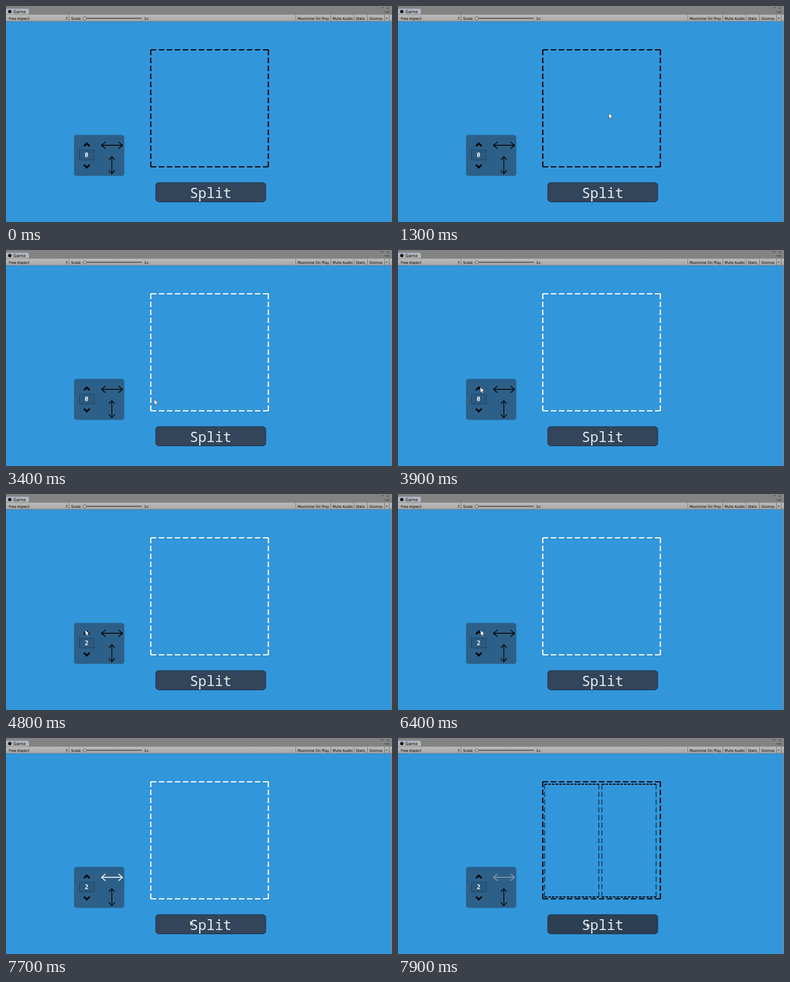
These frames come from a looping animation (640x360 px, 8 s). An HTML page:

```html
<!DOCTYPE html>
<html lang="en">
<head>
<meta charset="utf-8">
<title>Split box</title>
<style>
  html, body { margin: 0; width: 100%; height: 100%; overflow: hidden; background: #3296da; }
  svg { display: block; width: 640px; height: 360px; }
  .ui { font: 5.9px "DejaVu Sans", sans-serif; fill: #000; }
  .mono { font-family: "Noto Sans Mono", "DejaVu Sans Mono", monospace; text-anchor: middle; fill: #e9eef1; }
  .line { fill: none; stroke: currentColor; }
  .dark { color: #04070a; }
</style>
</head>
<body>
<svg viewBox="0 0 640 360">
  <defs>
    <linearGradient id="bar" x2="0" y2="1">
      <stop offset="0" stop-color="#bcbcbc"/>
      <stop offset="1" stop-color="#a6a6a6"/>
    </linearGradient>
    <!-- dashed square, 195 units a side -->
    <g id="box" class="line" stroke-width="2.2" stroke-dasharray="9 4.29">
      <path d="M0 0H195"/><path d="M0 195H195"/>
      <path d="M0 0V195"/><path d="M195 0V195"/>
    </g>
    <path id="chevron" class="line" stroke-width="2.8" d="M-4.7 2.4L0 -2.3L4.7 2.4"/>
    <g id="head" class="line"><path d="M6.5 -5.8L0 0L6.5 5.8"/></g>
  </defs>
  <rect width="640" height="360" fill="#3296da"/>

  <g id="toolbar">
    <rect width="640" height="14" fill="#838383"/>
    <path d="M0 14V4.5H36Q38 4.5 38 6.5V14Z" fill="#b7b8be"/>
    <path d="M0 4.8H37" stroke="#8c99c8" stroke-width=".8"/>
    <rect y="14" width="640" height="11.5" fill="url(#bar)"/>
    <path d="M0 14H640M0 25.5H640" stroke="#777" stroke-width=".7"/>
    <path d="M639.3 26V360" stroke="#858585" stroke-width="1.4"/>
    <circle cx="6.3" cy="9.3" r="2.8" fill="#151515"/>
    <path d="M131 20.5H225" stroke="#4c4c4c" stroke-width="1.4"/>
    <circle cx="130.6" cy="20.5" r="2.6" fill="#c4c4c4" stroke="#444" stroke-width=".8"/>
    <path d="M99.3 19.7l1.4-2 1.4 2zM99.3 21.2l1.4 2 1.4-2zM629.8 19.5h3l-1.5 2z" fill="#333"/>
    <path d="M623 5V2.5H626M631.5 2l3 3.2M634.5 2l-3 3.2M631.5 9h4M631.5 11h4M628.5 9.5h2l-1 1.5z"
          fill="none" stroke="#333" stroke-width=".7"/>
  </g>

  <use id="outer" href="#box" x="240" y="73"/>
  <g id="parts" class="dark"></g>

  <rect x="113.2" y="215.2" width="82.6" height="67.6" rx="4" fill="#2d6088" stroke="#295a81" stroke-width=".7"/>
  <g class="dark">
    <use href="#chevron" x="134" y="231.4"/>
    <use href="#chevron" transform="translate(134 267) scale(1 -1)"/>
    <path class="line" stroke-width="1.3" d="M175.5 251V279.5"/>
    <use href="#head" transform="translate(175.5 251) rotate(90) scale(.85)" stroke-width="1.5"/>
    <use href="#head" transform="translate(175.5 279.5) rotate(-90) scale(.85)" stroke-width="1.5"/>
  </g>
  <g id="wide" stroke-width="1.4">
    <path class="line" d="M158.5 232.3H193"/>
    <use href="#head" x="158.5" y="232.3"/>
    <use href="#head" transform="translate(193 232.3) scale(-1 1)"/>
  </g>
  <rect x="121.5" y="240.5" width="25" height="16" fill="#2b5a80" stroke="#142f49" stroke-width=".8" stroke-dasharray="2 1"/>
  <text id="count" class="mono" x="133.6" y="252" font-size="10" font-weight="600"></text>

  <rect id="button" x="248.3" y="294.4" width="182.4" height="32" rx="5" stroke="#1a2a3c" stroke-width=".9"/>
  <text class="mono" x="339.3" y="320" font-size="23">Split</text>

  <path id="cursor" d="M0 0V9L2.1 7.2L3.5 10.3L5.1 9.7L3.7 6.6L6.6 6.4Z" fill="#fff" stroke="#20303c" stroke-width=".6"/>
</svg>
<script>
  const LOOP = 8000, STEP = 100;
  const NS = "http://www.w3.org/2000/svg";
  const $ = id => document.getElementById(id);

  function add(parent, tag, attrs, text = "") {
    const el = document.createElementNS(NS, tag);
    for (const k in attrs) el.setAttribute(k, attrs[k]);
    el.textContent = text;
    $(parent).append(el);
  }

  // the square halved across its width
  for (const i of [0, 1])
    add("parts", "use", { href: "#box", transform: `translate(${243 + 95 * i} 77) scale(.4615 .964)` });

  function label(text, x, size = 5.9, y = 22.5) {
    add("toolbar", "text", { class: "ui", x, y, style: `font-size:${size}px` }, text);
  }
  function divider(x) {
    add("toolbar", "path", { d: `M${x} 14.5V25`, stroke: "#6c6c6c", "stroke-width": 0.8 });
  }
  const buttons = { "Maximize On Play": 483.5, "Mute Audio": 541.5, Stats: 580, Gizmos: 602.5 };
  label("Game", 12, 7, 11.8);
  label("Free Aspect", 4.5);
  label("Scale", 108);
  label("1x", 229);
  for (const name in buttons) {
    label(name, buttons[name]);
    divider(buttons[name] - 3);
  }
  [104.5, 627.5, 635.5].forEach(divider);

  // pointer trips: each starts where the last one ended
  const home = [452, 352];
  const trips = [
    { start: 900, end: 1300, to: [349.5, 178.5] },
    { start: 2700, end: 4000, to: [131.5, 226.5], bend: [18, 44] },
    { start: 6300, end: 6800, to: [183.5, 231] },
    { start: 7000, end: 7400, to: [283, 294] },
    { start: 7500, end: 7800, to: [312.8, 307.5] }
  ];
  const ease = k => k * k * (3 - 2 * k);

  function pointer(t) {
    let pos = home;
    for (const { start, end, to, bend = [0, 0] } of trips) {
      if (t < start) break;
      const k = ease(Math.min(1, (t - start) / (end - start)));
      pos = pos.map((p, i) => p + (to[i] - p) * k + bend[i] * 4 * k * (1 - k));
    }
    return pos;
  }

  function draw(now) {
    const t = Math.floor(now % LOOP / STEP) * STEP;
    const split = t >= 7900, picked = t >= 2600 && !split;
    $("outer").style.color = !picked ? "#05090d" : t < 2700 ? "#cfd5d9" : "#f7fafc";
    $("wide").style.color = split ? "#8d9bab" : t >= 7000 ? "#fff" : "#04070a";
    $("button").style.fill = t >= 7800 ? "#2d3f53" : "#32455b";
    $("count").textContent = t < 4200 ? 0 : t < 4400 ? 1 : 2;
    $("parts").style.visibility = split ? "visible" : "hidden";
    $("cursor").style.visibility = t >= trips[0].start ? "visible" : "hidden";
    $("cursor").setAttribute("transform", `translate(${pointer(t)})`);
  }

  const start = performance.now();
  function tick() {
    draw(performance.now() - start);
    requestAnimationFrame(tick);
  }
  tick();
</script>
</body>
</html>
```
